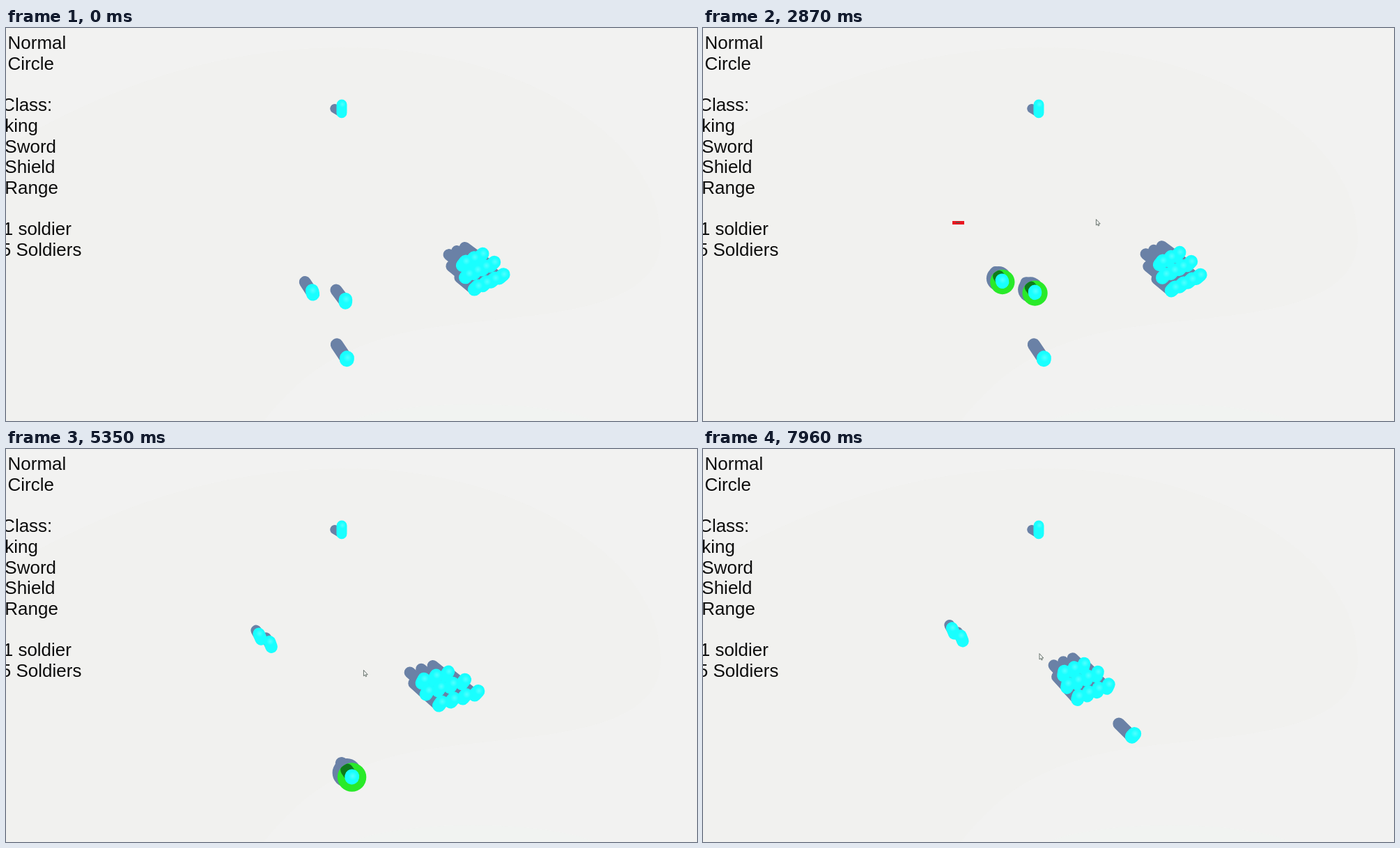
Animation, 992 px wide and 564 px high, one loop 8 s. Source, as an HTML page with a canvas:

```html
<!DOCTYPE html>
<html lang="en">
<head>
<meta charset="utf-8">
<title>Squad selection</title>
<style>
  html, body { margin: 0; width: 100%; height: 100%; overflow: hidden; background: #f1f1f0; }
  canvas { display: block; }
</style>
</head>
<body>
<canvas id="stage" width="992" height="564"></canvas>
<script>
const ctx = document.getElementById('stage').getContext('2d');
const LOOP = 8000, HOLD = 80, MARKER_LIFE = 1000;
const TAU = Math.PI * 2;

const lerp = (a, b, p) => a + (b - a) * p;
const mix = (a, b, p) => a.map((v, i) => lerp(v, b[i], p));
const clamp = p => Math.max(0, Math.min(1, p));
const smooth = p => p * p * (3 - 2 * p);
const shifted = ([x, y], [dx, dy], k) => [x + dx * k, y + dy * k];
// Soldiers set off at once and slow down as they arrive.
const progress = (t, start, duration) => Math.sin(clamp((t - start) / duration) * Math.PI / 2);

// Pointer gestures; the cursor glides from each one to the next.
const hover = (start, ...from) => ({ start, end: start, from, to: from });
const order = (start, ...from) => ({ start, end: start + 70, from, to: from, marker: true, pressed: true });
const drag = (start, end, from, to, picks) => ({ start, end, from, to, picks, pressed: true });

const isPair = id => id === 1 || id === 2;
const isRunner = id => id === 3;
const isSquad = id => id > 3;

const gestures = [
  hover(0, 934, 576),
  hover(860, 319, 425),
  drag(1540, 2070, [406, 315], [536, 466], isPair),
  order(2520, 366, 279),
  drag(2880, 3320, [565, 275], [763, 441], isSquad),
  hover(3480, 724, 397),
  hover(3720, 750, 427),
  order(4250, 545, 328),
  drag(4550, 4950, [456, 430], [553, 506], isRunner),
  hover(5180, 580, 345),
  drag(5520, 5900, [448, 291], [697, 509], id => isRunner(id) || isSquad(id)),
  hover(6210, 326, 182),
  hover(6360, 300, 118),
  drag(6500, 6950, [295, 171], [622.5, 543], id => id > 0),
  drag(7560, 7640, [483, 294], [483, 294], () => false)
];
const isActive = (g, t) => t >= g.start && t < g.end;

function cursorAt(t) {
  const next = gestures.findIndex(g => g.start > t);
  const i = next < 0 ? gestures.length - 1 : next - 1;
  const g = gestures[i], following = gestures[i + 1];
  if (t < g.end || !following) return mix(g.from, g.to, smooth(clamp((t - g.start) / (g.end - HOLD - g.start))));
  return mix(g.to, following.from, smooth((t - g.end) / (following.start - g.end)));
}

function pickedAt(t) {
  const last = gestures.filter(g => g.picks && g.start <= t).pop();
  return last && t >= last.end ? last.picks : () => false;
}

// Three slanted rows of 3, 4 and 4 soldiers that spread out on the march.
function squadHeads(t) {
  const p = progress(t, 4560, 3400);
  const bulge = Math.sin(Math.PI * p);
  const [cx, cy] = mix([685, 347], [548, 331], p);
  const spreadX = lerp(0.68, 0.8, p) + 0.28 * bulge;
  const spreadY = lerp(1.1 + 0.09 * clamp(t / 1700), 1.1, p) - 0.14 * bulge;
  const heads = [];
  for (let row = 0; row < 3; row++) {
    for (let col = 0; col < (row ? 4 : 3); col++) {
      const x = 18 * col + 6.5 * row * row - 37;
      const y = 16 * row - 5 * col - 11;
      heads.push([cx + x * spreadX, cy + y * spreadY]);
    }
  }
  return heads;
}

function headsAt(t) {
  return [
    [482, 110],
    mix([439.5, 377], [357.5, 257], progress(t, 2580, 3630)),
    mix([487.5, 389.5], [370, 268], progress(t, 2660, 3550)),
    mix([489.5, 473.5], [623, 407], progress(t, 5240, 3200)),
    ...squadHeads(t)
  ];
}

// Perspective: bodies lean away from the point below the camera.
function makeUnit([x, y], selected) {
  const lean = [(x - 480) * 0.026, (y - 560) * 0.026];
  const foot = shifted([x, y], lean, -1);
  const mid = shifted([x, y], lean, -0.5);
  const depth = foot[1] - 121;
  return {
    selected, foot, mid, head: [x, y],
    r: 7.5 + depth * 0.0082,
    ringR: 20 + (mid[1] - 446) * 0.029,
    shade: [-10 - depth * 0.011 - (foot[0] - 480) * 0.04, -6 - depth * 0.043]
  };
}

function capsule(a, b, r, color) {
  ctx.strokeStyle = color;
  ctx.lineCap = 'round';
  ctx.lineWidth = r * 2;
  ctx.beginPath();
  ctx.moveTo(...a);
  ctx.lineTo(...b);
  ctx.stroke();
}

function disc(x, y, r, color) {
  ctx.fillStyle = color;
  ctx.beginPath();
  ctx.arc(x, y, r, 0, TAU);
  ctx.fill();
}

function drawGround() {
  ctx.fillStyle = '#f2f2f1';
  ctx.fillRect(0, 0, 992, 564);
  ctx.fillStyle = '#f1f1ef';
  ctx.fill(new Path2D('M0 170C140 90 290 28 490 28C740 28 940 160 940 300C940 430 700 405 560 440C470 465 420 500 370 564H0Z'));
  ctx.fillStyle = '#f1f3f1';
  ctx.beginPath();
  ctx.ellipse(670, 580, 190, 40, 0, 0, TAU);
  ctx.fill();
}

function drawMenu() {
  const lines = [[2.5, 'Normal'], [2.5, 'Circle'], [0, ''], [-5.9, 'Class:'], [-1.7, 'king'], [-1.7, 'Sword'],
    [-1.7, 'Shield'], [-1.7, 'Range'], [0, ''], [-4.3, '1 soldier'], [-7.2, '5 Soldiers']];
  ctx.font = '26px "Liberation Sans", Arial, sans-serif';
  ctx.fillStyle = '#0c0c0c';
  ctx.textAlign = 'right';
  ctx.fillText('Formation:', 37, 0.3);
  ctx.textAlign = 'left';
  lines.forEach(([x, text], i) => ctx.fillText(text, x, 30 + i * 29.7));
}

function drawUnits(units) {
  const selected = units.filter(u => u.selected);
  const shadow = '#6a81a6';
  for (const u of selected) disc(u.mid[0] + u.shade[0] * 0.5, u.mid[1] + u.shade[1] * 0.3, u.ringR, shadow);
  for (const u of units) capsule(u.foot, shifted(u.foot, u.shade, 1), u.r * 0.88, shadow);

  const rings = new Path2D();
  for (const u of selected) {
    disc(...u.mid, u.ringR, '#29ea29');
    rings.moveTo(u.mid[0] + u.ringR, u.mid[1]);
    rings.arc(...u.mid, u.ringR, 0, TAU);
  }
  ctx.save();
  ctx.clip(rings);
  for (const u of selected) capsule(u.mid, shifted(u.mid, u.shade, 0.5), u.r * 0.88, '#0e7a1b');
  ctx.restore();

  // A ring hides the lower half of its soldier.
  for (const u of units) {
    capsule(u.selected ? u.mid : u.foot, u.head, u.r, '#19ffff');
    const [x, y] = shifted(u.head, [1, -0.5], 1);
    const glow = ctx.createRadialGradient(x, y, 0, x, y, u.r * 0.6);
    glow.addColorStop(0, 'rgba(120,255,255,.6)');
    glow.addColorStop(1, 'rgba(120,255,255,0)');
    disc(x, y, u.r * 0.6, glow);
  }
}

function drawMarker([x, y]) {
  ctx.fillStyle = '#ea1620';
  ctx.fillRect(x - 8, y - 2, 17, 5);
  ctx.fillStyle = '#80403c';
  ctx.fillRect(x - 3, y - 1, 6, 2);
}

function drawCursor([x, y], pressed) {
  if (pressed) disc(x + 0.5, y, 5.5, 'rgba(246,238,70,.8)');
  ctx.save();
  ctx.translate(x, y);
  const arrow = new Path2D('M0 0V8L1.8 6.4L3 9L4.3 8.4L3.1 6H5.4Z');
  ctx.fillStyle = '#f4f6f4';
  ctx.fill(arrow);
  ctx.lineWidth = 0.8;
  ctx.strokeStyle = '#4a5650';
  ctx.stroke(arrow);
  ctx.restore();
}

function draw(t) {
  const isPicked = pickedAt(t);
  const units = headsAt(t).map((head, id) => makeUnit(head, isPicked(id)));
  units.sort((a, b) => a.foot[1] - b.foot[1]);
  const cursor = cursorAt(t);
  const press = gestures.find(g => g.pressed && isActive(g, t));

  drawGround();
  for (const g of gestures) {
    if (g.marker && t >= g.start && t < g.start + MARKER_LIFE) drawMarker(g.from);
  }
  drawUnits(units);
  drawMenu();
  if (press) {
    const [x, y] = press.from;
    ctx.fillStyle = 'rgba(135,212,123,.35)';
    ctx.fillRect(x, y, cursor[0] - x, cursor[1] - y);
  }
  drawCursor(cursor, press);
}

function tick() {
  draw(performance.now() % LOOP);
  requestAnimationFrame(tick);
}
tick();
</script>
</body>
</html>
```
